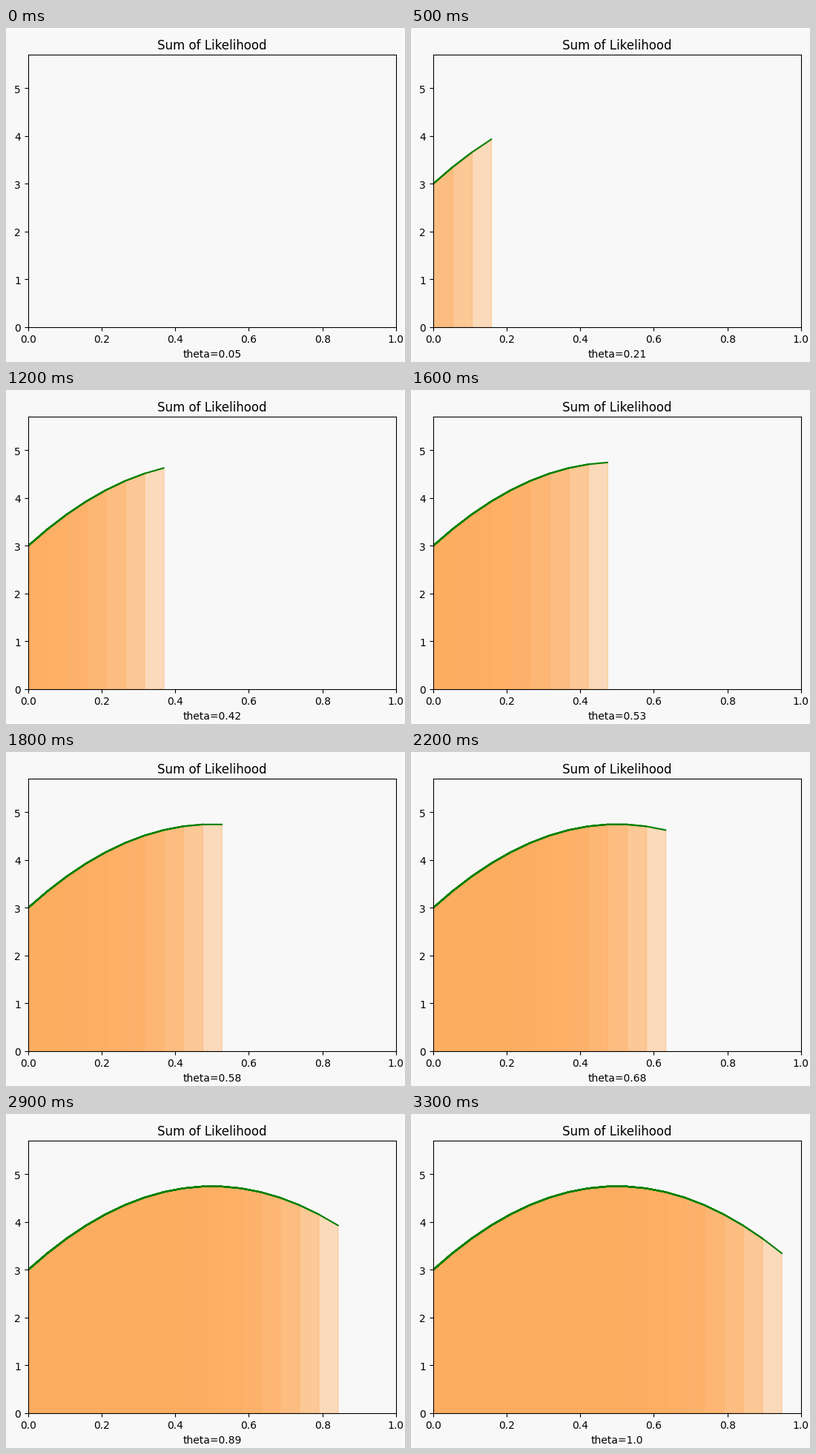
Write a matplotlib script that moves like this. It is 538 by 451 pixels and loops after 3.7 s.

```python
import numpy as np
import matplotlib.pyplot as plt
from matplotlib.animation import FuncAnimation
from matplotlib.transforms import Affine2D

W, H, DPI = 538, 451, 100
BACK, FILL, CURVE = "#f8f8f8", "#ffad60", "green"
TICK_MS = 100

plt.rcParams["font.family"] = "DejaVu Sans"

theta = np.linspace(0, 1, 20)
total = 3 + 7 * theta * (1 - theta)
STEPS = len(theta) - 1

# How many ticks each step stays on screen
holds = np.full(STEPS, 2)
holds[[0, 4, 12]] = 1
holds[-1] = 4
schedule = np.repeat(np.arange(STEPS), holds)

# The tiny surplus keeps the pixel size from being truncated
fig = plt.figure(figsize=((W + 0.001) / DPI, (H + 0.001) / DPI), dpi=DPI,
                 facecolor=BACK)
left, bottom, width, height = 29.85, 47.1, 496, 367.65
ax = fig.add_axes([left / W, bottom / H, width / W, height / H], facecolor=BACK)
ax.set_title("Sum of Likelihood")
label = ax.set_xlabel("")


def add_layer(step):
    """Area and curve covering the first step + 1 samples."""
    x, y = theta[:step + 1], total[:step + 1]
    area = ax.fill_between(x, y, color=FILL, alpha=0.4)
    line, = ax.plot(x, y, color=CURVE)
    return area, line


layers = [add_layer(k) for k in range(1, STEPS)]
ax.set_xlim(0, 1)
ax.set_ylim(0, 5.7)
ax.set_xticks(np.linspace(0, 1, 6))
ax.set_yticks(range(6))

# Text sits slightly low; the x label follows its tick labels
drop = Affine2D().translate(0, -0.6)
for text in (ax.title, *ax.get_xticklabels(), *ax.get_yticklabels()):
    text.set_transform(text.get_transform() + drop)


def update(tick):
    step = int(schedule[tick])
    # Translucent layers pile up, so older parts look denser
    for k, layer in enumerate(layers, start=1):
        for artist in layer:
            artist.set_visible(k <= step)
    label.set_text(f"theta={round(float(theta[step + 1]), 2)}")
    return [label, *(artist for layer in layers for artist in layer)]


anim = FuncAnimation(fig, update, frames=len(schedule), interval=TICK_MS,
                     init_func=lambda: update(0), repeat=True, repeat_delay=0)
plt.show()
```
